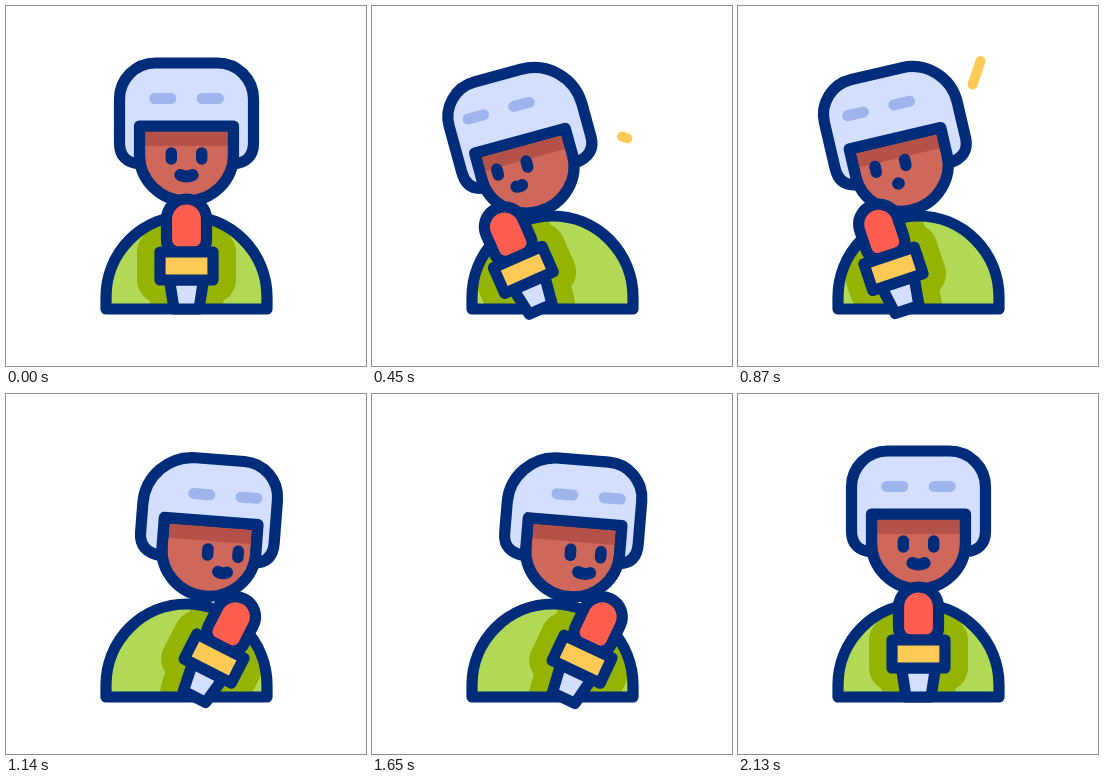
Write an HTML page with a canvas that moves like this. It is 360 by 360 pixels and loops after 2160 ms.

```html
<!DOCTYPE html>
<html lang="en">
<head>
<meta charset="utf-8">
<title>Reporter</title>
<style>
html, body { margin: 0; width: 100%; height: 100%; overflow: hidden; background: #fff; }
canvas { display: block; width: 360px; height: 360px; }
</style>
</head>
<body>
<canvas id="stage" width="360" height="360"></canvas>
<script>
const ctx = document.getElementById('stage').getContext('2d');
const LOOP = 2160, LINE = 11.2;
const NAVY = '#002c7a', PALE = '#d4deff', VENT = '#9db4ec', SKIN = '#cf675a', BROW = '#b4524a';
const RED = '#ff5e4f', YELLOW = '#fdca55', GREEN = '#b1d955', SHADE = '#94b302';

// Offsets from the upright pose when fully turned to either side
const left = { tilt: -19.2, x: -38, y: 15.5, look: -20.5, lift: -4.5, mic: -27.4, micX: -36.5, micY: 6 };
const right = { tilt: 6.7, x: 31, y: 11, look: 23, lift: 1, mic: 35, micX: 42, micY: 10.5 };

function ease(t, start, length) {
  const u = Math.min(1, Math.max(0, (t - start) / length));
  return (1 - Math.cos(Math.PI * u)) / 2;
}

// -1 is fully left, 1 fully right
function turn(t) {
  return 2 * ease(t, 703, 577) - ease(t, 60, 530) - ease(t, 1370, 720);
}

function poseAt(t) {
  const now = turn(t), late = turn(t - 18);
  const mix = (name, q) => Math.abs(q) * (q < 0 ? left : right)[name];
  return {
    x: 180.5 + mix('x', now),
    y: 115 + mix('y', late),
    tilt: mix('tilt', late),
    look: mix('look', now),
    lift: mix('lift', now),
    mic: mix('mic', Math.sign(now) * Math.abs(now) ** 0.8),
    micX: 180.5 + mix('micX', late),
    micY: 260 + mix('micY', late * Math.abs(late)),
    smile: t < 1440 ? 0.5 + 0.5 * Math.cos(2 * Math.PI * t / 360) : 1
  };
}

function outline(path, color, width) {
  ctx.strokeStyle = color;
  ctx.lineWidth = width;
  ctx.stroke(path);
}
function paint(path, fill) {
  ctx.fillStyle = fill;
  ctx.fill(path);
  outline(path, NAVY, LINE);
}
function bar(x1, y1, x2, y2, color, width) {
  ctx.strokeStyle = color;
  ctx.lineWidth = width;
  ctx.beginPath();
  ctx.moveTo(x1, y1);
  ctx.lineTo(x2, y2);
  ctx.stroke();
}
function place(x, y, deg, draw) {
  ctx.save();
  ctx.translate(x, y);
  ctx.rotate(deg * Math.PI / 180);
  draw();
  ctx.restore();
}

const body = new Path2D('M100 303V291A80.5 81 0 0 1 261 291V303Z');

// Microphone parts, around the middle of the band
const knob = new Path2D();
knob.roundRect(-20, -67, 40, 53, [20, 20, 12, 12]);
const band = new Path2D('M-26.5 -14H26.5V14H-26.5Z');
const grip = new Path2D('M-17 14L-12.5 43H12.5L17 14Z');

function drawBody(p) {
  ctx.fillStyle = GREEN;
  ctx.fill(body);
  ctx.save();
  ctx.clip(body);
  place(p.micX, p.micY, p.mic, () => {
    for (const part of [knob, band, grip]) outline(part, SHADE, 46);
  });
  ctx.restore();
  outline(body, NAVY, LINE);
}

function drawHead(p) {
  const shift = p.look * 0.15, l = -47 + shift, r = 47 + shift;
  const rim = 5 - p.lift / 2, top = -58 + p.lift;
  // The corner turned away from the viewer gets rounder
  const rl = 36 + 0.8 * Math.max(0, p.look), rr = 36 + 0.8 * Math.max(0, -p.look);
  const face = new Path2D(`M${l} ${rim}V34A47 46 0 0 0 ${r} 34V${rim}Z`);
  const helmet = new Path2D(`M${l} ${rim}V43Q-67 41 -67 22V${top + rl}A${rl} ${rl} 0 0 1 ${rl - 67} ${top}` +
    `H${67 - rr}A${rr} ${rr} 0 0 1 67 ${top + rr}V22Q67 41 ${r} 43V${rim}Z`);
  ctx.fillStyle = SKIN;
  ctx.fill(face);
  ctx.fillStyle = BROW;
  ctx.fillRect(l, rim, 94, 20);
  outline(face, NAVY, LINE);
  paint(helmet, PALE);

  for (const side of [-1, 1]) {
    const vent = p.look * 0.88 + side * 23.7, eye = p.look + side * 15.2;
    const ventY = -22.5 + p.lift * 1.4, eyeY = 35 + p.lift;
    bar(vent - 8, ventY, vent + 8, ventY, VENT, 11);
    bar(eye, eyeY - 3, eye, eyeY + 3, NAVY, 11.5);
  }
  const w = 0.05 + 6 * p.smile, mx = p.look + 4 * (1 - p.smile), my = 54 + p.lift;
  const mouth = new Path2D(`M${mx - w} ${my}Q${mx} ${my + 3 * p.smile} ${mx + w} ${my}`);
  outline(mouth, NAVY, 12);
}

function drawMic() {
  paint(knob, RED);
  paint(grip, PALE);
  paint(band, YELLOW);
}

// Each ray grows outward, then shrinks away toward its tip
const rays = [
  [250, 130.5, 284.5, 142.5],
  [246, 110.5, 278.5, 95.5],
  [230.5, 90.5, 242.5, 55]
];
function drawRays(t) {
  rays.forEach(([x1, y1, x2, y2], i) => {
    const tip = ease(t, 420 + 90 * i, 120), tail = ease(t, 612 + 100 * i, 150);
    if (tip < 0.02 || tail > 0.98) return;
    const dx = x2 - x1, dy = y2 - y1;
    bar(x1 + dx * tail, y1 + dy * tail, x1 + dx * tip, y1 + dy * tip, YELLOW, 10);
  });
}

function render(t) {
  const p = poseAt(t);
  ctx.fillStyle = '#fff';
  ctx.fillRect(0, 0, 360, 360);
  ctx.lineCap = ctx.lineJoin = 'round';
  drawBody(p);
  drawRays(t);
  place(p.x, p.y, p.tilt, () => drawHead(p));
  place(p.micX, p.micY, p.mic, drawMic);
}

const begin = performance.now();
function tick() {
  render(Math.max(0, performance.now() - begin) % LOOP);
  requestAnimationFrame(tick);
}
tick();
</script>
</body>
</html>
```
